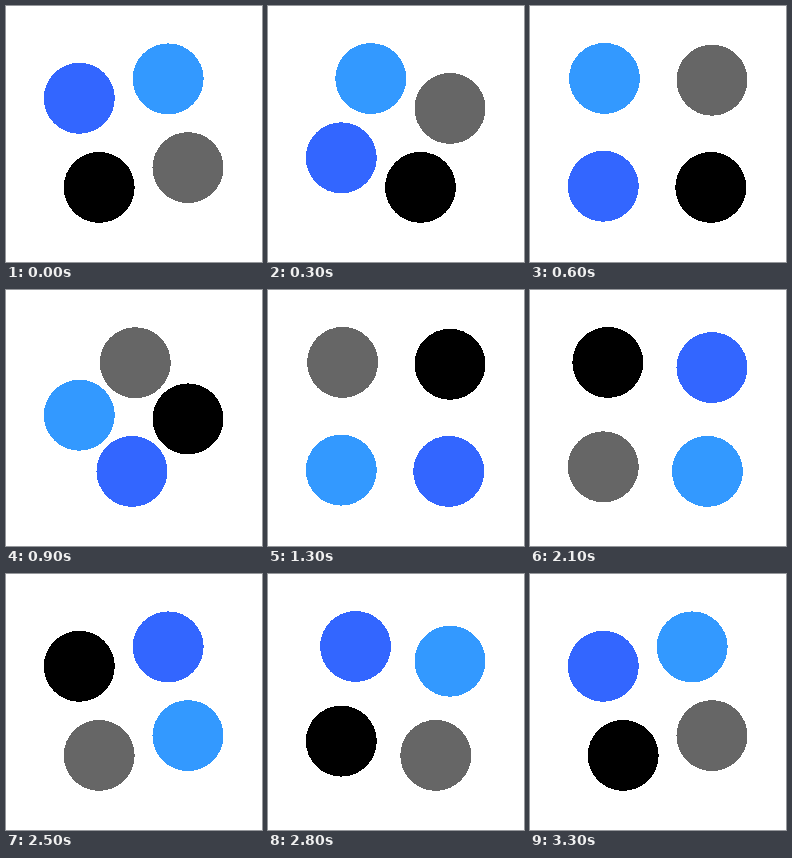
Recreate the animation shown at these times as an HTML page. Size 256 by 256 pixels, loop 3.4 s.

```html
<!DOCTYPE html>
<html>
<head>
<meta charset="utf-8">
<style>
  html, body { margin: 0; width: 100%; height: 100%; overflow: hidden; background: #fff; }
  svg { display: block; width: 100vw; height: 100vh; }
</style>
</head>
<body>
<svg viewBox="0 0 256 256" shape-rendering="crispEdges">
  <circle r="35.5" fill="#3399ff"/>
  <circle r="35.5" fill="#3366ff"/>
  <circle r="35.5" fill="#000"/>
  <circle r="35.5" fill="#666"/>
</svg>
<script>
const LOOP = 3400, STEP = 100, MOVE = 7;
// Corners, counterclockwise from the top right
const corners = [[182, 73], [73.3, 72.4], [73.3, 181.4], [182, 181.4]];
// Step at which each move along a side begins
const starts = [-1.04, 6, 14.8, 22.96, 30.96];
const discs = document.querySelectorAll('circle');

const bezier = (a, b, s) => 3 * a * s * (1 - s) ** 2 + 3 * b * s * s * (1 - s) + s ** 3;

// cubic-bezier(.25, .1, .25, 1)
function ease(u) {
  if (u >= 1) return 1;
  let lo = 0, hi = 1;
  for (let i = 0; i < 24; i++) {
    const mid = (lo + hi) / 2;
    if (bezier(.25, .25, mid) < u) lo = mid; else hi = mid;
  }
  return bezier(.1, 1, lo);
}

function draw(now) {
  // The first picture stays for two steps
  const step = Math.max(0, Math.floor(now % LOOP / STEP) - 1);
  const move = starts.findLastIndex(s => s <= step);
  const p = ease((step - starts[move]) / MOVE);
  discs.forEach((disc, i) => {
    const from = corners[(i + move) % 4], to = corners[(i + move + 1) % 4];
    disc.setAttribute('cx', from[0] + (to[0] - from[0]) * p);
    disc.setAttribute('cy', from[1] + (to[1] - from[1]) * p);
  });
}

const origin = performance.now();
function tick() {
  draw(performance.now() - origin);
  requestAnimationFrame(tick);
}
tick();
</script>
</body>
</html>
```
